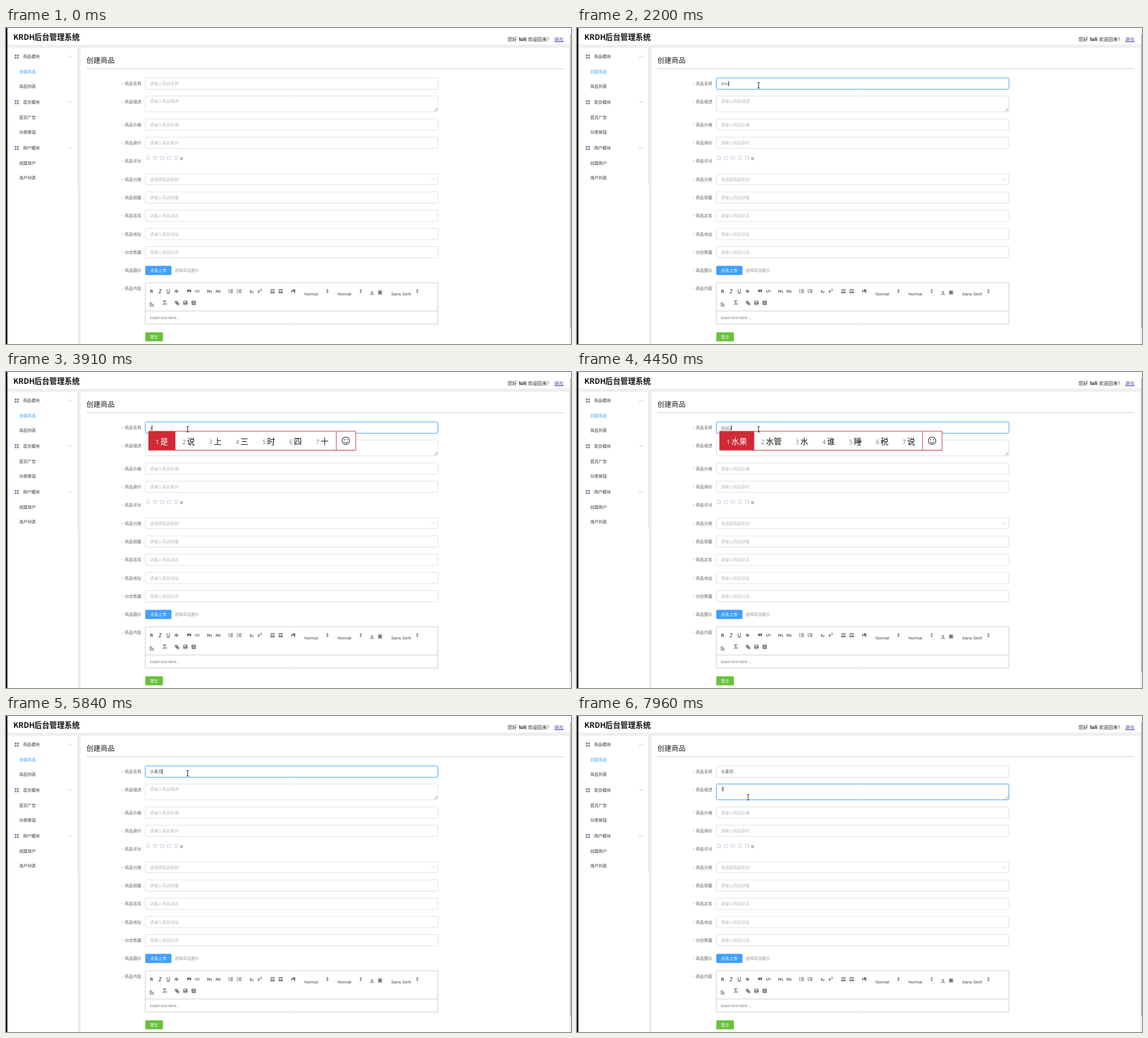
These frames come from a looping animation (1000 px wide and 560 px high, 8000 ms). An HTML page with a canvas:

```html
<!DOCTYPE html>
<html lang="zh-CN">
<head>
<meta charset="utf-8">
<title>创建商品</title>
<style>
html, body { margin: 0; width: 1000px; height: 560px; overflow: hidden; background: #fff; }
canvas { display: block; }
</style>
</head>
<body>
<canvas id="stage" width="1000" height="560"></canvas>
<script>
const ctx = document.getElementById('stage').getContext('2d');
const LOOP = 8000;
const CJK = '"Noto Sans CJK SC", "Noto Sans CJK JP", "Noto Sans CJK", sans-serif';
const ARIAL = '"Liberation Sans", Arial, sans-serif';
const SIZE = 7.3;
const BLUE = '#409eff', EDGE = '#dcdfe6', HOVER = '#c0c4cc', INK = '#303133', BODY = '#606266', HINT = '#b4b8c0', ICON = '#444';

// y is the vertical middle of the glyphs
function text(str, x, y, color = BODY, size = SIZE, style = '', family = CJK) {
  ctx.font = `${style} ${size}px ${family}`;
  ctx.fillStyle = color;
  ctx.fillText(str, x, y + size * 0.37);
}
const arial = (str, x, y, color, size = SIZE, style = '') => text(str, x, y, color, size, style, ARIAL);

function rect(x, y, w, h, color) {
  ctx.fillStyle = color;
  ctx.fillRect(x, y, w, h);
}
function box(x, y, w, h, r, stroke, fill) {
  ctx.beginPath();
  ctx.roundRect(x, y, w, h, r);
  if (fill) { ctx.fillStyle = fill; ctx.fill(); }
  if (stroke) { ctx.strokeStyle = stroke; ctx.lineWidth = 1; ctx.stroke(); }
}
function line(points, color = ICON, width = 1) {
  ctx.beginPath();
  for (let i = 0; i < points.length; i += 2) ctx.lineTo(points[i], points[i + 1]);
  ctx.strokeStyle = color;
  ctx.lineWidth = width;
  ctx.stroke();
}
function ring(x, y, r, color, width = 1, a = 0, b = Math.PI * 2) {
  ctx.beginPath();
  ctx.arc(x, y, r, a, b);
  ctx.strokeStyle = color;
  ctx.lineWidth = width;
  ctx.stroke();
}
function disc(x, y, r, color) {
  ctx.beginPath();
  ctx.arc(x, y, r, 0, Math.PI * 2);
  ctx.fillStyle = color;
  ctx.fill();
}

function header() {
  rect(0, 0, 1000, 560, '#fff');
  rect(2, 29.5, 998, 5.5, '#eeeeee');
  rect(127, 30, 5, 530, '#eeeeee');
  rect(997, 30, 3, 530, '#f0f0f0');
  rect(998.6, 11, 1.4, 521, '#b4b4b4');
  rect(0, 0, 2.4, 560, '#000');
  text('KRDH', 13, 16.5, '#111', 13.3, 'bold');
  text('后台管理系统', 50, 16.5, '#111', 13.4, 'bold');
  text('您好', 887.7, 20, '#222', 8.3);
  text('luli', 908, 20, '#111', 8.3, 'bold');
  text('欢迎回来！', 924, 20, '#222', 8.3);
  text('退出', 970.3, 20, '#45459a', 8.3);
  rect(970.3, 24, 16.6, 0.8, '#45459a');
}

function sidebar() {
  rect(126, 35, 1, 243, '#e6e6e6');
  const groups = [
    [50.5, '商品模块', '创建商品', '商品列表'],
    [131.5, '首页模块', '首页广告', '分类按钮'],
    [212.5, '用户模块', '创建用户', '用户列表']
  ];
  groups.forEach(([y, title, ...items], g) => {
    for (let i = 0; i < 4; i++) rect(15.5 + (i % 2) * 4.2, y - 3.5 + (i >> 1) * 4.2, 3, 3, '#7d86a0');
    text(title, 30.3, y, INK);
    line([109.8, y + 1.5, 112.8, y - 1.5, 115.8, y + 1.5], '#a0a3aa', 0.7);
    items.forEach((s, i) => text(s, 23.5, y + 27 + i * 26.2, g + i ? INK : BLUE));
  });
}

function star(x, y) {
  ctx.beginPath();
  for (let i = 0; i < 10; i++) {
    const r = i % 2 ? 2.2 : 4.5, a = i * Math.PI / 5 - Math.PI / 2;
    ctx.lineTo(x + r * Math.cos(a), y + r * Math.sin(a));
  }
  ctx.closePath();
  ctx.strokeStyle = '#bccadb';
  ctx.lineWidth = 0.8;
  ctx.stroke();
}

const LABELS = ['商品名称', '商品描述', '商品价格', '商品原价', '商品评分', '商品分类', '商品销量', '商品店名', '商品地址', '分店数量', '商品图片', '商品内容'];
const HINTS = { 2: '请输入商品价格', 3: '请输入商品原价', 5: '请选择商品类别', 6: '请输入商品销量', 7: '请输入商品店名', 8: '请输入商品地址', 9: '请输入商品分店' };
const rowY = i => i < 2 ? 98.3 + i * 32.3 : 171 + (i - 2) * 32.3;
const field = (y, color) => box(246.5, y - 9.8, 518, 20, 2, color, '#fff');

function form() {
  text('创建商品', 142.3, 57, '#222', 12.5);
  rect(142, 71.5, 845, 1, '#c9c9c9');
  LABELS.forEach((s, i) => {
    const y = rowY(i);
    arial('*', 205, y + 1, '#f2996b');
    text(s, 210.3, y, BODY);
    if (HINTS[i]) {
      field(y, EDGE);
      text(HINTS[i], 254.6, y, HINT);
    }
  });
  for (let i = 0; i < 5; i++) star(251.2 + i * 12.45, 230.2);
  arial('0', 308.8, 231, '#1f2d3d');
  line([753, 266.4, 755.9, 269.3, 758.8, 266.4], '#b4b8c0', 0.8);
  box(246.5, 421.5, 46.3, 16.3, 1.5, null, BLUE);
  text('点击上传', 254.8, 429.6, '#fff');
  text('选择商品图片', 298.4, 429.6, '#999');
  box(246.5, 539.2, 31.3, 16, 1.5, null, '#67c23a');
  text('提交', 254.8, 547.2, '#fff');
}

const bars = (x, y, ...rows) => rows.forEach(([a, b], i) => line([x + a, y + i * 2.5, x + b, y + i * 2.5]));

function picker(x) {
  ctx.fillStyle = ICON;
  for (const s of [-1, 1]) {
    ctx.beginPath();
    ctx.moveTo(x - 2, 466.4 + s);
    ctx.lineTo(x + 2, 466.4 + s);
    ctx.lineTo(x, 466.4 + s * 3.4);
    ctx.fill();
  }
}

function editor() {
  box(246.5, 451.5, 518, 73, 0, '#ccc', '#fff');
  line([246.5, 501.5, 764.5, 501.5], '#ccc');
  const y = 466.4;
  arial('B', 254.8, y, ICON, 8, 'bold');
  line([271.2, y - 3, 275.4, y - 3], ICON);
  line([273.8, y - 3, 272, y + 3], ICON);
  line([270, y + 3, 274.3, y + 3], ICON);
  line([285, y - 3.5, 285, y], ICON);
  ring(287.2, y, 2.2, ICON, 1, 0, Math.PI);
  line([289.4, y - 3.5, 289.4, y], ICON);
  line([284, y + 3.8, 290.4, y + 3.8], ICON, 0.9);
  arial('S', 299.3, y, ICON, 7.6, 'bold');
  line([298.2, y, 305.2, y], ICON, 0.7);
  for (const x of [322.1, 325.9]) {
    rect(x - 1.5, y - 2.5, 3, 3, ICON);
    line([x + 1.2, y, x - 0.3, y + 2.6], ICON);
  }
  line([336.8, y - 2.2, 334.8, y, 336.8, y + 2.2]);
  line([339.5, y - 2.5, 337.7, y + 2.5]);
  line([340.4, y - 2.2, 342.4, y, 340.4, y + 2.2]);
  for (const n of [1, 2]) {
    const x = 341 + n * 15;
    arial('H', x, y, ICON, 7.4, 'bold');
    arial(String(n), x + 5.4, y + 0.8, ICON, 6, 'bold');
  }
  for (const x of [394, 409]) {
    for (const d of [-2.5, 0, 2.5]) rect(x - 0.3, y + d - 0.7, 1.4, 1.4, ICON);
    bars(x, y - 2.5, [2.8, 7.6], [2.8, 7.6], [2.8, 7.6]);
  }
  arial('x', 431, y, ICON, 7.4, 'bold');
  arial('2', 435.6, y + 2, ICON, 4.6, 'bold');
  arial('x', 445.2, y, ICON, 7.4, 'bold');
  arial('2', 450, y - 2.2, ICON, 4.6, 'bold');
  [468, 482.5].forEach((x, i) => {
    bars(x, y - 3, [0, 7.5], [3.5, 7.5], [0, 7.5]);
    line([x, y + 3, x + 7.5, y + 3], ICON, 0.8);
    line(i ? [x, y - 1.6, x + 1.8, y - 0.4, x, y + 0.8] : [x + 2, y - 1.6, x + 0.2, y - 0.4, x + 2, y + 0.8]);
  });
  line([504.8, y - 2, 506.6, y, 504.8, y + 2], ICON, 1.2);
  disc(509.2, y - 1.4, 1.7, ICON);
  line([509.8, y - 2.8, 509.8, y + 3.2]);
  line([511.4, y + 3.2, 511.4, y - 2.8, 512.4, y - 2.8], ICON, 0.7);

  arial('Normal', 528, 470.8, ICON, 7.5);
  arial('Normal', 586.8, 470.8, ICON, 7.5);
  arial('Sans Serif', 681.8, 470.8, ICON, 7.5);
  [569, 627.8, 728].forEach(picker);
  arial('A', 645.4, 468.2, ICON, 7);
  line([644.3, 472.2, 651.2, 472.2], ICON, 0.9);
  rect(658.3, 465, 7.6, 7.8, '#aaa');
  arial('A', 659.6, 468.9, '#222', 7);

  bars(254, 487.4, [0, 4.5], [0, 7.5], [0, 7.5]);
  line([277.5, 483.8, 283.8, 483.8]);
  line([281.2, 483.8, 279.6, 489.8]);
  line([277.2, 490, 280, 490], ICON, 0.8);
  line([281.2, 487.6, 284.2, 490.6], ICON, 0.9);
  line([284.2, 487.6, 281.2, 490.6], ICON, 0.9);
  ring(301.3, 486, 1.8, ICON, 1.2);
  ring(304.2, 488.8, 1.8, ICON, 1.2);
  line([301.6, 486.2, 304, 488.6]);
  box(314.2, 484, 6.6, 6, 0.5, ICON);
  line([314.8, 489, 316.6, 487, 317.8, 488, 319.2, 486.4, 320.4, 488.8], ICON, 1.2);
  box(329, 484, 6.4, 6.2, 0, ICON);
  line([330.8, 484, 330.8, 490]);
  line([333.6, 484, 333.6, 490]);
  line([330.8, 487, 333.6, 487], ICON, 0.8);
  arial('Insert text here ...', 254.6, 513, '#777', 7, 'italic');
}

// [start, value, candidates]; candidates mean the text is still being composed
const TYPING = [
  [0, ''], [1820, 's'], [1970, 'sh'], [2120, 'shu'], [2200, 'shui'],
  [2830, 'shu'], [2990, 'sh'], [3440, ''], [3750, 's', ''],
  [3910, 's', '是 说 上 三 时 四 十'],
  [4000, 'sh', '是 说 上 时 十 事 使'],
  [4070, 'shu', '书 数 树 属 输 熟 术'],
  [4150, 'shui', '水 谁 睡 税 说 蜕 帅'],
  [4450, "shui'g", '水果 水管 水 谁 睡 税 说'],
  [4530, "shui'gu", '水库 水鼓 谁 水 睡 税 说'],
  [4610, "shui'guo", '水果 睡过 谁过 税过 水 谁 睡'],
  [4910, "shui'guo'l", '睡过了 水果了 水果捞 水果类 水果篮 谁过来 水果'],
  [5460, "shui'guo'la", '水果啦 水果辣 水果蜡 睡过啦 谁过啦 水果拉 水果'],
  [5550, "shui'guo'lao", '水果捞 水果 睡过 谁过 水 谁 睡'],
  [5840, '水果捞']
];
const CARET = [[1110, 1650], [1820, 2760], [3290, 6390]];
const during = (t, spans) => spans.some(([a, b]) => t >= a && t < b);
const latest = (t, list) => list.filter(e => t >= e[0]).pop();

function value(str, y) {
  const latin = /^[\w']*$/.test(str);
  (latin ? arial : text)(str, 254.8, y, BODY);
  return str ? ctx.measureText(str).width : 0;
}
const caret = (x, y) => rect(Math.round(x), y - 4.3, 0.9, 9, '#222');

function popup(words) {
  const wide = w => 33.5 + 13.8 * w.length;
  const total = words.reduce((s, w) => s + wide(w), 0);
  ctx.save();
  ctx.shadowColor = 'rgba(0,0,0,.18)';
  ctx.shadowBlur = 3;
  ctx.shadowOffsetX = ctx.shadowOffsetY = 0.5;
  rect(252, 104.5, total + 35.5, 34.5, '#fff');
  ctx.restore();
  let x = 252.5;
  words.forEach((w, i) => {
    if (!i) rect(x, 105, wide(w), 33.5, '#cf2a36');
    text(String(i + 1), x + 12.4, 124, i ? '#777' : '#fff', 10.2, '', '"Open Sans", sans-serif');
    text(w, x + 20.6, 122.6, i ? '#111' : '#fff', 14);
    x += wide(w);
  });
  const edge = Math.round(x) + 0.5;
  box(252.5, 105, edge + 34.5 - 252.5, 33.5, 0, '#cf3a48');
  line([edge, 105, edge, 138.5], '#cf3a48');
  const cx = edge + 17;
  ring(cx, 121.8, 6.6, '#222', 1.1);
  disc(cx - 2.4, 120, 0.9, '#222');
  disc(cx + 2.4, 120, 0.9, '#222');
  ring(cx, 122, 3.6, '#222', 1, 0.35, Math.PI - 0.35);
}

function nameField(t) {
  const y = 98.3;
  const [, border] = latest(t, [[0, EDGE], [880, HOVER], [1110, '#a9bedb'], [1190, BLUE], [7020, '#9cc4ef'], [7100, EDGE]]);
  field(y, border);
  const [, str, words] = latest(t, TYPING);
  if (!str) text('请输入商品名称', 254.6, y, HINT);
  const w = value(str, y);
  if (words !== undefined) for (let x = 255; x < 254.8 + w; x += 2) rect(x, 102, 1.2, 0.9, '#555');
  if (during(t, CARET)) caret(254.3 + w, y);
}

function noteField(t) {
  const [, border] = latest(t, [[0, EDGE], [6870, HOVER], [7020, '#8fbdec'], [7100, BLUE]]);
  box(246.5, 120.5, 518, 28, 2, border, '#fff');
  line([757.5, 147.5, 763.5, 141.5], '#777', 0.8);
  line([760.7, 147.5, 763.5, 144.7], '#777', 0.8);
  const typed = t >= 7960 ? '3' : '';
  if (!typed) text('请输入商品描述', 254.6, 129.2, HINT);
  const w = value(typed, 129.2);
  if (typed || during(t, [[7020, 7490]])) caret(254.3 + w, 129.2);
}

function pointerAt(t) {
  if (t < 730) {
    const k = Math.floor((t - 70) / 73.4) / 9, j = 1 - k;
    return [j * j * 892 + 2 * j * k * 420 + k * k * 321.5, j * j * 518 - 2 * j * k * 28 + k * k * 101.5];
  }
  return latest(t, [
    [0, 321.5, 101.5], [6540, 322, 107], [6710, 320, 119], [6790, 316, 131], [6870, 312, 140],
    [7790, 308, 142], [7870, 303, 144]
  ]).slice(1);
}

function overField(x, y) {
  if (x < 246 || x > 765) return false;
  if (y >= 120 && y <= 149) return true;
  return [0, 2, 3, 6, 7, 8, 9].some(i => Math.abs(y - rowY(i)) < 10.5);
}

function pointer(t) {
  if (t < 70) return;
  const [x, y] = pointerAt(t);
  if (during(t, [[730, 1190], [6940, 7180]])) {
    ctx.globalCompositeOperation = 'multiply';
    disc(x - 0.3, y, 8.2, '#fcf95a');
    ctx.globalCompositeOperation = 'source-over';
  }
  if (overField(x, y)) {
    line([x, y - 4.5, x, y + 4.5], '#222', 1);
    for (const s of [-1, 1]) line([x - 2.4, y + s * 4.7, x + 2.4, y + s * 4.7], '#222', 0.9);
    return;
  }
  ctx.beginPath();
  [[0, 0], [0, 10], [2.3, 8], [3.8, 11.4], [5.3, 10.7], [3.9, 7.4], [7, 7.2]].forEach(([a, b]) => ctx.lineTo(x + a, y + b));
  ctx.closePath();
  ctx.fillStyle = '#fff';
  ctx.fill();
  ctx.strokeStyle = '#000';
  ctx.lineWidth = 0.8;
  ctx.stroke();
}

function draw(t) {
  header();
  sidebar();
  form();
  editor();
  nameField(t);
  noteField(t);
  const words = latest(t, TYPING)[2];
  if (words) popup(words.split(' '));
  pointer(t);
}

const start = performance.now();
function tick() {
  draw((performance.now() - start) % LOOP);
  requestAnimationFrame(tick);
}
tick();
</script>
</body>
</html>
```
